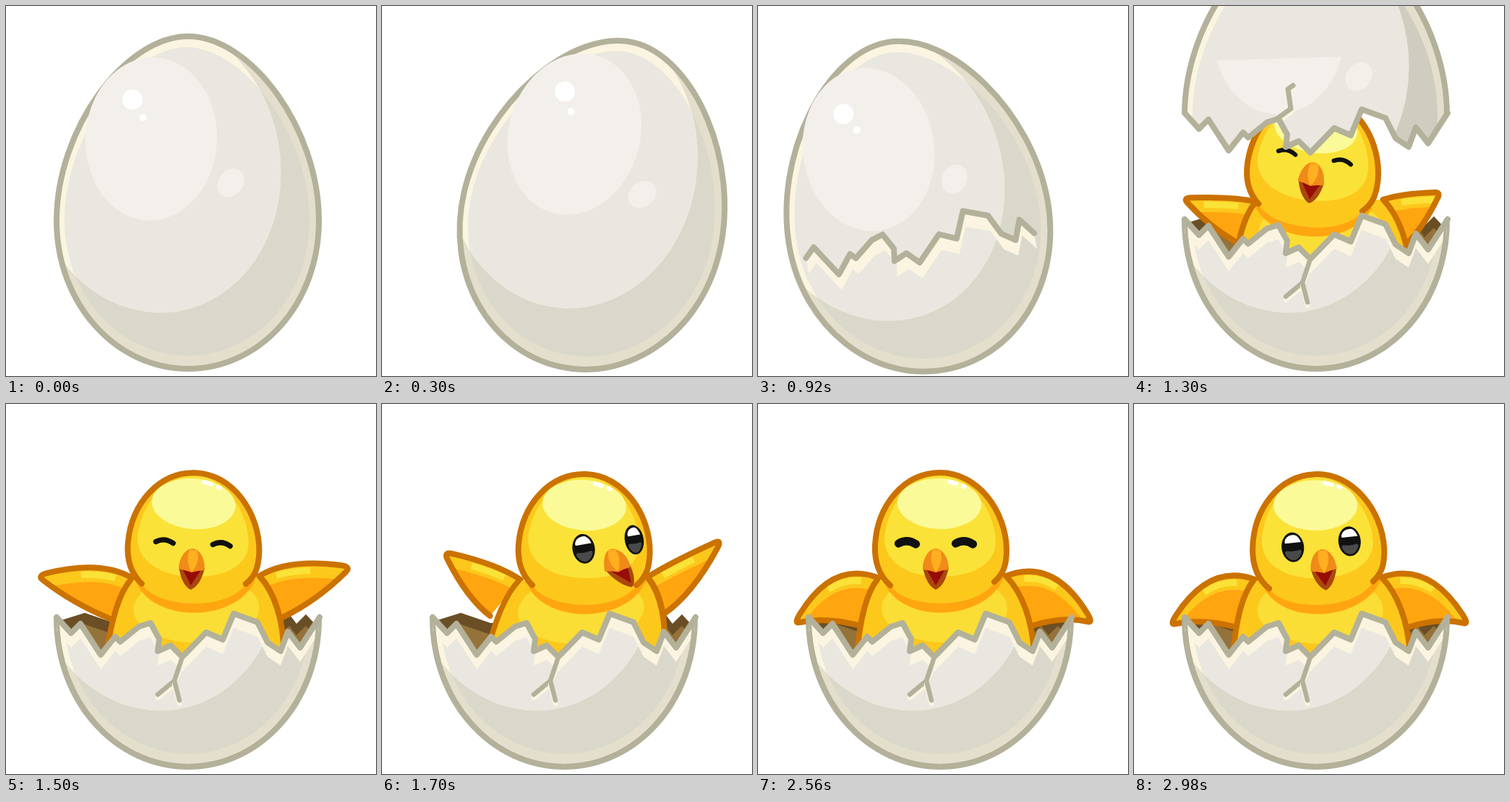
An HTML page with a canvas for the animation above (3020 ms loop, 512x512 px).

```html
<!DOCTYPE html>
<html lang="en">
<head>
<meta charset="utf-8">
<title>Hatching chick</title>
<style>
html, body { margin: 0; width: 100%; height: 100%; overflow: hidden; background: #fff; }
canvas { display: block; width: 512px; height: 512px; }
</style>
</head>
<body>
<canvas id="stage" width="512" height="512"></canvas>
<script>
const ctx = document.getElementById('stage').getContext('2d');
const LOOP = 3020, STEP = 20, HATCH = 1160;
const SHELL = '#b3b19a', CREAM = '#faf4e1', BROWN = '#cb7200';
const YELLOW = '#fcc81c', LIGHT = '#fbe238', ORANGE = '#ffa510';

const egg = new Path2D('M252 42C339 42 433 170 433 297C433 412 352 502 252 502C152 502 70 412 70 297C70 170 165 42 252 42Z');
const inner = new Path2D('M250 57C328 57 420 178 420 297C420 400 346 484 252 484C158 484 81 400 81 297C81 178 172 57 250 57Z');
const edge = [[70, 295], [90, 317], [103, 304], [131, 347], [151, 322], [158, 329], [184, 308],
  [200, 303], [212, 325], [210, 342], [228, 334], [244, 350], [277, 316], [300, 326], [315, 290],
  [348, 302], [362, 330], [380, 342], [390, 315], [407, 337], [434, 295]];
const topBranch = [[220, 257], [213, 262], [217, 289], [198, 303]];
const lowBranches = [[[244, 350], [233, 383], [210, 402]], [[233, 383], [240, 410]]];

// x, y, tilt: head; gaze, lean: face; flap: wing angle; left, right: wing reach
const rest = { x: 0, y: 0, tilt: 0, gaze: 0, lean: 0, open: 1, flap: 28, left: 134, right: 137 };
const emerge = { ...rest, x: -11, y: 30, tilt: 6, gaze: 4, lean: 10, open: 0, flap: -3, left: 102, right: 80 };
const tucked = { ...emerge, y: 70, flap: 30, left: 50, right: 50 };
const popped = { ...rest, x: 3, tilt: 2, gaze: 8, lean: 4, open: 0, flap: 0, right: 129 };
const turned = { ...rest, x: 25, y: 2, tilt: 2, gaze: 68, lean: -10, flap: -20, left: 113, right: 117 };
const spread = { ...rest, x: 16, y: -1, tilt: 2, gaze: 40, lean: -2, flap: 0, left: 146, right: 135 };
const ahead = { ...rest, x: 7, y: -2, tilt: 3, gaze: 16, lean: 3.6, flap: 17, left: 139, right: 126 };
const settled = { ...rest, x: 2, tilt: 1, gaze: 2, lean: 1 };
const squint = { ...rest, y: -3, open: 0, flap: 24, left: 139, right: 131 };
const smile = { ...rest, open: .35 };
const opened = { ...rest, x: 1, y: 1, gaze: 4, lean: -3 };
const last = { ...rest, x: 4, y: 2, tilt: -2, gaze: 13, lean: -6 };
const acts = [[HATCH, tucked], [1300, emerge], [1460, popped], [1680, turned], [1700, turned],
  [1860, spread], [2040, ahead], [2220, settled], [2240, settled], [2400, squint],
  [2560, smile], [2760, opened], [2780, opened], [2980, last]];

const mix = (a, b, k) => a + (b - a) * k;
const smooth = k => (1 - Math.cos(Math.PI * k)) / 2;
const clamp = (v, lo, hi) => Math.min(hi, Math.max(lo, v));
const rad = deg => deg * Math.PI / 180;

function poseAt(t) {
  let i = 0;
  while (i < acts.length - 2 && t >= acts[i + 1][0]) i++;
  const [t0, a] = acts[i], [t1, b] = acts[i + 1], out = {};
  const k = smooth(clamp((t - t0) / (t1 - t0), 0, 1));
  for (const key in a) out[key] = mix(a[key], b[key], k);
  return out;
}

function group(draw) { ctx.save(); draw(); ctx.restore(); }
function fill(path, color) { ctx.fillStyle = color; ctx.fill(path); }
function stroke(path, color, width) {
  ctx.strokeStyle = color;
  ctx.lineWidth = width;
  ctx.stroke(path);
}
function oval(x, y, rx, ry, turn = 0) {
  const p = new Path2D();
  p.ellipse(x, y, rx, ry, turn, 0, Math.PI * 2);
  return p;
}
function line(points, dy = 0) {
  const p = new Path2D();
  points.forEach(([x, y]) => p.lineTo(x, y + dy));
  return p;
}
function band(points, depth) {
  const p = line(points);
  [...points].reverse().forEach(([x, y]) => p.lineTo(x, y + depth));
  return p;
}
function spin(angle, x, y) {
  ctx.translate(x, y);
  ctx.rotate(rad(angle));
  ctx.translate(-x, -y);
}

function drawEgg(shade = '#d9d8ca') {
  fill(egg, '#e4dfcc');
  fill(inner, shade);
  group(() => {
    ctx.clip(oval(205, 220, 174.5, 205, -.16));
    fill(egg, CREAM);
    fill(inner, '#e9e7df');
  });
  stroke(egg, SHELL, 8);
}

function drawGloss() {
  fill(oval(201, 184, 91, 113, .05), '#f3f0ec');
  fill(oval(311, 244.5, 17, 21, .65), '#f3f0ec');
}

function drawCrack(points, width) {
  stroke(line(points, 5), CREAM, width);
  stroke(line(points), SHELL, width);
}

function drawWholeEgg(t) {
  const u = clamp((t - (t < 560 ? 20 : 560)) / 440, 0, 1);
  group(() => {
    spin(13 * Math.sin(4 * Math.PI * u), 263, 470);
    drawEgg();
    drawGloss();
    fill(oval(175, 129.5, 14, 14), '#fff');
    fill(oval(189.5, 154.5, 5, 5), '#fff');
    if (t <= 560) return;
    const reach = Math.min(10, 2 + Math.floor((t - 560) / 50));
    const part = edge.slice(10 - reach, 11 + reach);
    fill(band(part, 22), CREAM);
    stroke(line(part), SHELL, 8);
    if (reach === 10) {
      drawCrack(topBranch, 7);
      lowBranches.forEach(b => drawCrack(b, 6.5));
    }
  });
}

function drawInside() {
  const rim = [[74, 300], [109, 289], [150, 303], [380, 303], [392, 291], [402, 304], [415, 291], [428, 305], [418, 350], [92, 350]];
  fill(line(rim), '#6a4e25');
  group(() => {
    ctx.clip(line(rim));
    fill(line(rim, 16), '#95723a');
  });
}

function drawBottom() {
  group(() => {
    ctx.clip(line([[0, 295], ...edge, [512, 295], [512, 512], [0, 512]]));
    drawEgg();
    ctx.clip(egg);
    fill(band(edge, 20), CREAM);
    stroke(egg, SHELL, 8);
  });
  lowBranches.forEach(b => drawCrack(b, 6.5));
  stroke(line(edge), SHELL, 8);
}

function drawTop(dy) {
  group(() => {
    ctx.translate(0, dy);
    group(() => {
      ctx.clip(line([[0, 295], ...edge, [512, 295], [512, 0], [0, 0]]));
      drawEgg('#cfcdbf');
      ctx.clip(line([[0, 226], [512, 210], [512, 512], [0, 512]]));
      drawGloss();
    });
    drawCrack(topBranch, 7);
    stroke(line(edge), SHELL, 8);
  });
}

// A leaf from shoulder to tip and back to the hip; a lowered wing arches more
function drawWing(side, x, y, angle, reach, hipX, hipY, sunk) {
  const dx = side * reach * Math.cos(rad(angle)), drop = reach * Math.sin(rad(angle));
  const arch = (26 + .42 * drop) * clamp(1 - sunk / 40, 0, 1);
  const tip = [x + dx, y + drop], hip = [hipX, hipY + .15 * drop];
  const over = [x + .33 * dx + side * arch * drop / reach, y + .33 * drop - arch * Math.abs(dx) / reach];
  const under = [(tip[0] + hip[0]) / 2, (tip[1] + hip[1]) / 2 + 8 - .3 * drop];
  const near = p => p.map((v, i) => mix(v, tip[i], .84));

  const crest = new Path2D();
  crest.moveTo(x, y);
  crest.quadraticCurveTo(...over, ...near(over));
  const shape = new Path2D(crest);
  shape.quadraticCurveTo(...tip, ...near(under));
  shape.quadraticCurveTo(...under, ...hip);
  fill(shape, YELLOW);
  group(() => {
    ctx.clip(shape);
    ctx.translate(0, 20);
    const body = new Path2D(shape);
    body.lineTo(hip[0], hip[1] + 40);
    fill(body, ORANGE);
    ctx.translate(0, -10);
    ctx.setLineDash([0, 26, 48, 500]);
    ctx.lineCap = 'butt';
    stroke(crest, LIGHT, 9);
  });
  stroke(shape, BROWN, 8);
}

function drawEye(x, rx, open) {
  group(() => {
    ctx.translate(x, 0);
    if (open < .45) {
      stroke(new Path2D('M-12 0Q0 -7 12 1'), '#111', 6 + open * 15);
      return;
    }
    ctx.scale(1, open);
    fill(oval(0, 0, rx, 20.5), '#111');
    ctx.clip(oval(0, 0, rx - 3, 18));
    fill(oval(0, 12, rx - 2, 11), '#4a4a4a');
    fill(oval(0, 0, rx, 5.5), '#111');
    ctx.beginPath();
    ctx.rect(-20, -20, 40, 14);
    ctx.clip();
    fill(oval(1, -8, rx - 4, 9), '#fff');
  });
}

function drawBeak(turn) {
  const tip = -4 * turn, jaw = 15 * turn;
  fill(new Path2D(`M-18 33Q${jaw * .7 - 13} 58 ${jaw} 64Q${jaw * .7 + 13} 58 18 33Z`), '#a9480c');
  fill(new Path2D(`M-14 34L${jaw} 58L14 34Z`), '#960c08');
  fill(new Path2D(`M-18 36C-18 19 ${tip - 9} 7 ${tip} 7C${tip + 9} 7 18 19 18 36Q9 37 0 40Q-9 37 -18 36Z`), '#f08a18');
  fill(new Path2D(`M${tip - 4} 8Q${tip - 10} 24 0 40Q${tip + 12} 24 ${tip + 6} 9Z`), '#ffaf20');
}

function drawFace(p) {
  const turn = clamp((p.gaze - p.x - 10) / 33, 0, 1);
  group(() => {
    ctx.translate(246 + p.gaze, 193 + .55 * p.y);
    ctx.rotate(rad(p.lean));
    const gap = 39.5 - 4 * turn;
    drawEye(-gap, 15.5, p.open);
    drawEye(gap, 15.5 - 2.5 * turn, p.open);
    ctx.translate(6 * turn, 0);
    drawBeak(turn);
  });
}

function drawChick(p) {
  const sway = p.x + 2.2 * p.tilt, top = .8 * sway, bottom = .25 * sway, sunk = Math.max(0, p.y);
  const onBody = draw => group(() => {
    const skew = (bottom - top) / 100;
    ctx.transform(1, 0, skew, 1, top - skew * 245, sunk);
    draw();
  });
  const onHead = draw => group(() => {
    ctx.translate(p.x, p.y);
    spin(p.tilt, 253, 250);
    draw();
  });
  const torso = new Path2D('M165 243C150 262 141 300 137 345L180 385L325 385L382 345C380 300 365 260 343 238');
  const sides = new Path2D('M165 243C150 262 141 300 137 345M382 345C380 300 365 260 343 238');
  const skull = new Path2D('M183 251C166 236 161 216 162 195C165 140 202 95 252 95C304 95 343 148 344 201C344 222 340 235 327 246');
  const head = new Path2D(skull);
  head.bezierCurveTo(305, 285, 205, 285, 183, 251);

  const hipX = .4 * top, hipY = 297 + p.y;
  drawWing(-1, 168 + top, 241 + p.y, p.flap, p.left, 140 + hipX, hipY, sunk);
  drawWing(1, 343 + top, 238 + p.y, p.flap * 1.15 - 4, p.right, 380 + hipX, hipY, sunk);
  onBody(() => {
    fill(torso, YELLOW);
    fill(oval(258, 283, 87, 47), '#fadd35');
  });
  onHead(() => fill(new Path2D('M174 245C195 305 315 303 340 240Z'), ORANGE));
  onBody(() => stroke(sides, BROWN, 8));
  onHead(() => {
    fill(head, YELLOW);
    fill(new Path2D('M252 99C295 99 328 150 329 190C329 222 296 239 252 239C206 239 175 218 175 187C178 140 212 99 252 99Z'), LIGHT);
    fill(oval(251, 138, 58, 35, .04), '#fbfa98');
    stroke(skull, BROWN, 8);
    stroke(new Path2D('M265 107.5L274 110M284 113.5L286 114.5'), '#fff', 6);
  });
  drawFace(p);
}

function draw(t) {
  ctx.fillStyle = '#fff';
  ctx.fillRect(0, 0, 512, 512);
  ctx.lineCap = ctx.lineJoin = 'round';
  if (t <= HATCH) return drawWholeEgg(t);
  drawInside();
  drawChick(poseAt(t));
  drawBottom();
  drawTop(-1.05 * (t - HATCH));
}

const began = performance.now();
function tick() {
  const t = (performance.now() - began) % LOOP;
  draw(Math.floor(t / STEP) * STEP);
  requestAnimationFrame(tick);
}
tick();
</script>
</body>
</html>
```
